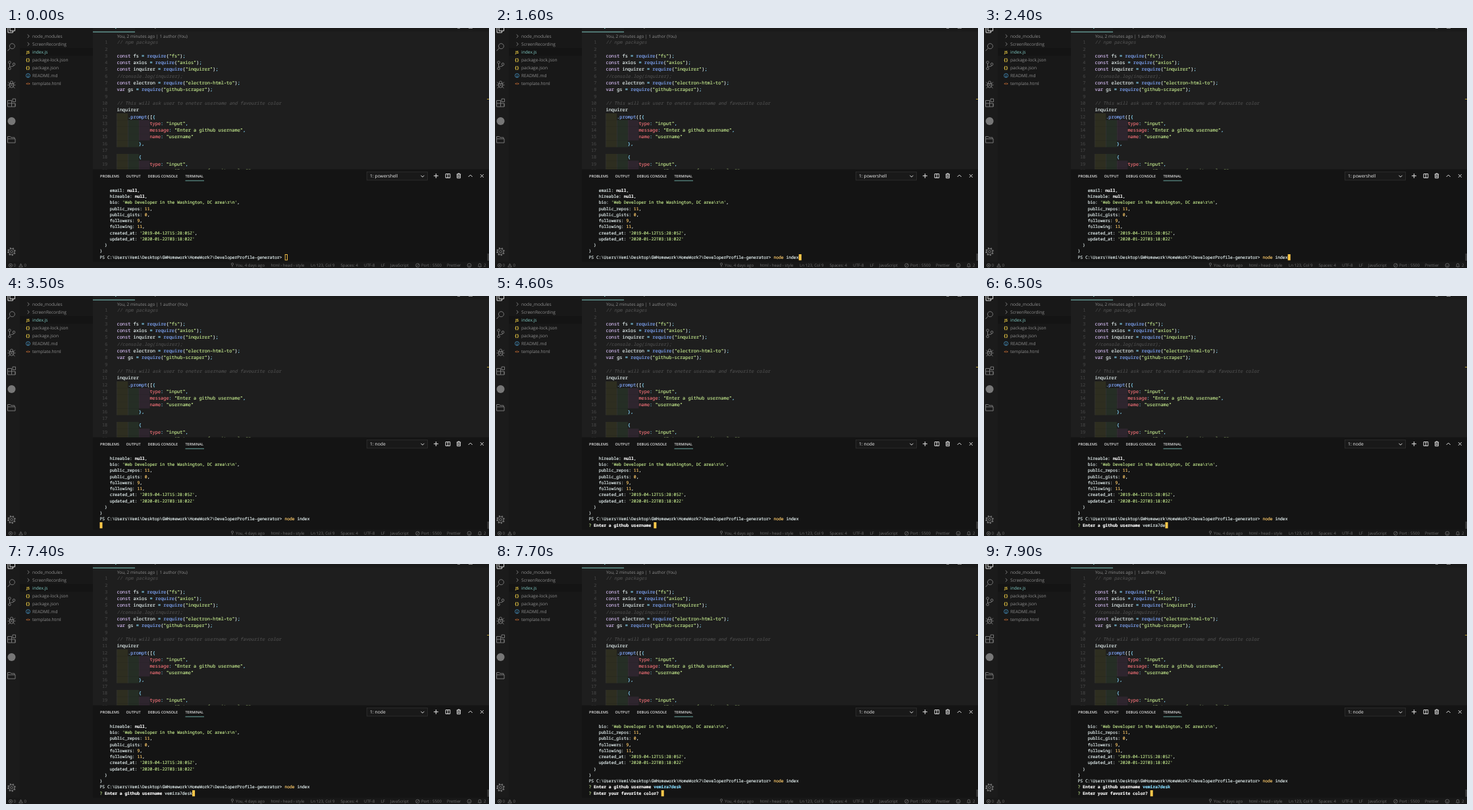
Write an HTML page that moves like this. It is 734x366 px and loops after 8000 ms.

```html
<!DOCTYPE html>
<html lang="en">
<head>
<meta charset="utf-8">
<title>Editor and terminal</title>
<style>
  html, body { margin: 0; width: 100%; height: 100%; overflow: hidden; background: #1e1e1e; }
  svg { display: block; }
  text { white-space: pre; text-rendering: geometricPrecision; }
  tspan { fill: currentColor; stroke: currentColor; stroke-width: .16; }
  .ui { font-family: "Open Sans", "Noto Sans", sans-serif; }
  .mono { font-family: "Noto Sans Mono", "Liberation Mono", monospace; }
  .icon { fill: none; stroke: #777; stroke-width: 1; stroke-linejoin: round; }
</style>
</head>
<body>
<svg id="stage" width="734" height="366" viewBox="0 0 734 366">
  <g id="editor"></g>
  <g id="chrome"></g>
  <g id="terminal"></g>
</svg>
<script>
const LOOP = 8000;
const NS = 'http://www.w3.org/2000/svg';
const byId = id => document.getElementById(id);
const editor = byId('editor'), chrome = byId('chrome'), terminal = byId('terminal');

const TEXT = '#e6f2f2', GREEN = '#c3e88d', YELLOW = '#ffcb6b', CYAN = '#89ddff',
  BLUE = '#82aaff', LILAC = '#d0b8ee', RED = '#f07178', ACCENT = '#80cbc4', BRIGHT = '#ffffff';

function add(parent, tag, attrs, content) {
  const el = document.createElementNS(NS, tag);
  for (const key in attrs) el.setAttribute(key, attrs[key]);
  if (content) el.textContent = content;
  return parent.appendChild(el);
}
const box = (parent, x, y, width, height, fill) => add(parent, 'rect', { x, y, width, height, fill });
const label = (x, y, str, size, fill, extra) =>
  add(chrome, 'text', { class: 'ui', x, y, 'font-size': size, fill, ...extra }, str);
const icon = (x, y, d, extra) =>
  add(chrome, 'path', { class: 'icon', d, transform: `translate(${x} ${y})`, ...extra });
const ring = r => `M${-r} 0a${r} ${r} 0 1 0 ${2 * r} 0a${r} ${r} 0 1 0 ${-2 * r} 0`;

// A line of monospaced text; each part is [string, colour, bold?]
function line(parent, x, y, size, parts) {
  const el = add(parent, 'text', { class: 'mono', x, y, 'font-size': size });
  for (const [str, color, bold] of parts)
    add(el, 'tspan', bold ? { color, 'font-weight': 700 } : { color }, str);
  return el;
}

// Splits a string by a pattern with named groups and colours the pieces
function colour(str, pattern, styles) {
  const parts = [];
  let at = 0;
  for (const m of str.matchAll(pattern)) {
    if (m.index > at) parts.push([str.slice(at, m.index), TEXT]);
    const kind = Object.keys(m.groups).find(k => m.groups[k] !== undefined);
    parts.push([m[0], ...styles[kind]]);
    at = m.index + m[0].length;
  }
  if (at < str.length) parts.push([str.slice(at), TEXT]);
  return parts;
}

function drawEditor() {
  const X = 168.5, CW = 4.17, LH = 10.3, TAB = CW * 4;
  const code = [
    '// npm packages',
    '',
    'const fs = require("fs");',
    'const axios = require("axios");',
    'const inquirer = require("inquirer");',
    '//console.log(inquirer);',
    'const electron = require("electron-html-to");',
    'var gs = require("github-scraper");',
    '',
    '// This will ask user to eneter username and favourite color',
    'inquirer',
    '    .prompt([{',
    '            type: "input",',
    '            message: "Enter a github username",',
    '            name: "username"',
    '        },',
    '',
    '        {',
    '            type: "input",',
    '            message: "Enter your favorite color?"'
  ];
  const pattern = new RegExp([
    '(?<comment>//.*)', '(?<string>"[^"]*")', '(?<word>\\b(?:const|var)\\b)',
    '(?<prop>\\b\\w+(?=:))', '(?<call>\\w+(?=\\())', '(?<mark>[=.,:;{}]+)'
  ].join('|'), 'g');
  const styles = { comment: ['#4c4c4c'], string: [GREEN], word: [LILAC], prop: [RED], call: [BLUE], mark: [CYAN] };
  const tints = ['#2e2e20', '#252e25', '#2e252e'];

  box(editor, 0, 0, 734, 366, '#1e1e1e');
  code.forEach((str, i) => {
    const y = 24.2 + i * LH;
    const indent = str.search(/\S/) / 4;
    for (let k = 0; k < indent; k++) {
      box(editor, X + k * TAB, y - 7.3, TAB, LH + .05, tints[k]);
      box(editor, X + k * TAB, y - 7.3, .6, LH + .05, '#383838');
    }
    const row = line(editor, X, y, CW / .6, colour(str, pattern, styles));
    if (str.startsWith('//')) row.setAttribute('font-style', 'italic');
    const num = String(i + 1);
    line(editor, 154.3 - num.length * CW, y, CW / .6, [[num, '#424242']]);
  });
}

function drawSidebar() {
  box(chrome, 0, 0, 21, 357, '#1b1b1b');
  box(chrome, 21, 0, 111, 357, '#181818');
  box(chrome, 21, 30.5, 111, 12, '#141414');

  const files = [
    ['', 'node_modules'], ['', 'ScreenRecording'], ['JS', 'index.js', '#f0cf45'],
    ['{}', 'package-lock.json', '#f0cf45'], ['{}', 'package.json', '#f0cf45'],
    ['i', 'README.md', '#4a9cd0'], ['<>', 'template.html', '#e07a3a']
  ];
  files.forEach(([mark, name, tone], i) => {
    const y = 12.5 + i * 12;
    label(40, y + 2.4, name, 6.65, i === 2 ? ACCENT : '#8c8c8c');
    if (!mark) icon(34, y, 'M-1.3-2.5L1.3 0L-1.3 2.5', { style: 'stroke:#999;stroke-width:.8' });
    else if (mark === '{}') label(33.6, y + 2.2, mark, 7, tone, { 'text-anchor': 'middle', 'font-weight': 700, 'letter-spacing': .6 });
    else label(33.5, y + 2, mark, mark === 'i' ? 5 : 5.8, tone, { 'text-anchor': 'middle', 'font-weight': 700 });
    if (mark === 'i') icon(33.5, y, ring(3), { style: `stroke:${tone};stroke-width:.8` });
  });

  icon(8.5, 0, 'M-2.5-3V4.3H5V-3M-2.5-1H-5.5V7H2V4.3', { style: 'stroke:#ddd' });
  icon(8.5, 29, 'M-2 1.5A4 4 0 1 1 1.2 2.7A4 4 0 0 1-2 1.5L-6 6');
  icon(8.5, 57, 'M-3-3V3M3.5 0C3.5 2.5-3 1-3 3M-4.8-4.6a1.8 1.8 0 1 0 3.6 0a1.8 1.8 0 1 0-3.6 0' +
    'M-4.8 4.8a1.8 1.8 0 1 0 3.6 0a1.8 1.8 0 1 0-3.6 0M1.7-1.8a1.8 1.8 0 1 0 3.6 0a1.8 1.8 0 1 0-3.6 0');
  icon(8.5, 86, 'M-3-1.5H3V2A3 3 0 0 1-3 2ZM-2-1.5V-3A2 2 0 0 1 2-3V-1.5M-3 1H-6M3 1H6' +
    'M-3-1L-5.3-3.5M3-1L5.3-3.5M-2.6 3.5L-5 5.8M2.6 3.5L5 5.8M-2.5-1.5L2.5 3.5M2.5-1.5L-2.5 3.5');
  icon(8.5, 114, 'M-6-3.5H0V6H-6ZM-6 1H5.5V6H0M5.5 1V6M1.5-6H6V-1.5H1.5Z');
  add(chrome, 'circle', { cx: 8.5, cy: 142, r: 6, fill: '#777' });
  icon(8.5, 170, 'M-6 5V-4.5H-2L-.5-3H4.5V-1M-6 5H5.5V-1H-6');
  icon(8.5, 341, ring(1.8));
  icon(8.5, 341, ring(4.3));
  icon(8.5, 341, ring(5.4), { style: 'stroke-width:1.8', 'stroke-dasharray': '2.1 2.14' });
}

function drawTop() {
  box(chrome, 196, 0, 538, 5.5, '#1a1a1a');
  box(chrome, 132, 5.5, 64, 1, ACCENT);
  box(chrome, 166, 0, 1.5, 1, ACCENT);
  box(chrome, 226, 0, 1.5, 1, '#777');
  box(chrome, 686, 0, 4, 1, '#888');
  box(chrome, 703, 0, 6, 1, '#888');
  box(chrome, 731, 108, 3, 1, '#b59a30');
  label(169, 15.4, 'You, 2 minutes ago | 1 author (You)', 6.5, '#8c8c8c');
}

function drawPanel() {
  box(chrome, 132, 215.5, 602, 141.5, '#141414');
  const tabs = [[143, 'PROBLEMS'], [182.5, 'OUTPUT'], [215.5, 'DEBUG CONSOLE'], [272.5, 'TERMINAL']];
  for (const [x, name] of tabs) label(x, 228, name, 5.5, '#e4e4e4', { 'font-weight': 600 });
  box(chrome, 272.5, 232.5, 28.5, .8, ACCENT);
  add(chrome, 'rect', { x: 548.5, y: 219.5, width: 92, height: 12.5, fill: '#191919', stroke: '#303030', 'stroke-width': .8 });

  const light = { style: 'stroke:#e0e0e0' };
  icon(633, 226, 'M-2.5-1.2L0 1.3L2.5-1.2', light);
  icon(653.5, 225.5, 'M-3.5 0H3.5M0-3.5V3.5', light);
  icon(671.5, 225.5, 'M-3.3-3H3.3V3H-3.3ZM0-3V3', light);
  icon(688, 225.5, 'M-3.2-2.5H3.2M-1.2-2.5V-3.6H1.2V-2.5M-2.4-2.5V3.3H2.4V-2.5M-.8-1V2M.8-1V2', light);
  icon(705.7, 225.5, 'M-3 1.5L0-1.5L3 1.5', light);
  icon(723.3, 225.5, 'M-2.4-2.4L2.4 2.4M2.4-2.4L-2.4 2.4', light);
  box(chrome, 731.5, 344, 2.5, 11, '#3c3c3c');
}

function drawStatus() {
  const tone = '#6c6c6c';
  box(chrome, 0, 356.5, 734, 9.5, '#181818');
  const items = [
    [11.5, '0'], [27.5, '0'], [349, 'You, 4 days ago'], [402.5, 'html › head › style'],
    [463, 'Ln 123, Col 9'], [508.5, 'Spaces: 4'], [544, 'UTF-8'], [569.7, 'LF'], [584, 'JavaScript'],
    [631, 'Port : 5500'], [670, 'Prettier'], [726, '2']
  ];
  for (const [x, str] of items) label(x, 364.2, str, 6.15, tone);
  const thin = { style: `stroke:${tone};stroke-width:.8` };
  icon(7, 362, ring(2.7) + 'M-1.2-1.2L1.2 1.2M1.2-1.2L-1.2 1.2', thin);
  icon(22.5, 362, 'M-2.8 2.4L0-2.7L2.8 2.4ZM0-.8V1', thin);
  icon(344, 361, 'M-1.6-1a1.6 1.6 0 1 0 3.2 0a1.6 1.6 0 1 0-3.2 0M0 .6V3.6', thin);
  icon(625.5, 362, ring(2.8) + 'M2-2L-2 2', thin);
  icon(704, 362, ring(3) + 'M-1.5.7Q0 2.2 1.5.7M-1-1V-.6M1-1V-.6', thin);
  icon(720, 362, 'M-2.5 1.8H2.5L1.8.6V-1A1.8 1.8 0 0 0-1.8-1V.6ZM-.6 2.8H.6', thin);
}

const CW = 3.8, LH = 9.27, ROWS = 12, LEFT = 142.5;
const USER = 'vemira7desk';
const output = [
  '    email: null,',
  '    hireable: null,',
  "    bio: 'Web Developer in the Washington, DC area\\r\\n',",
  '    public_repos: 11,',
  '    public_gists: 0,',
  '    followers: 9,',
  '    following: 11,',
  "    created_at: '2019-04-12T15:28:05Z',",
  "    updated_at: '2020-01-22T03:18:02Z'",
  '  }',
  '}'
].map(str => colour(str, /(?<string>'[^']*')|(?<none>\bnull\b)|(?<num>\b\d+\b)/g,
  { string: [GREEN], none: [BRIGHT, true], num: [YELLOW] }));

const at = { focus: 500, recall: 1600, run: 3500, ask: 4000, answer: 7700 };
// [time, letters typed]
const typing = [[4900, 1], [5100, 2], [5400, 3], [5500, 4], [5700, 6],
  [6100, 7], [6300, 8], [6400, 9], [6600, 10], [6800, 11]];

const question = str => [['? ', GREEN], [str + ' ', BRIGHT, true]];

function screen(t) {
  const prompt = [['PS C:\\Users\\Vemi\\Desktop\\GWHomework\\HomeWork7\\DeveloperProfile-generator> ', TEXT]];
  if (t >= at.recall) prompt.push(['node', YELLOW], [' index', TEXT]);
  const rows = [...output, prompt];
  if (t >= at.run) rows.push([]);
  if (t >= at.ask) {
    const count = typing.reduce((n, [time, letters]) => t >= time ? letters : n, 0);
    const done = t >= at.answer;
    rows[rows.length - 1] = [...question('Enter a github username'), [USER.slice(0, count), done ? CYAN : TEXT, done]];
    if (done) rows.push(question('Enter your favorite color?'));
  }
  return rows.slice(-ROWS);
}

function drawTerminal(t) {
  terminal.replaceChildren();
  const rows = screen(t);
  rows.forEach((parts, i) => line(terminal, LEFT, 249.7 + i * LH, CW / .6, parts));
  const length = rows[ROWS - 1].reduce((n, [str]) => n + str.length, 0);
  const x = LEFT + length * CW;
  if (t >= at.focus) box(terminal, x, 345, 4, 9.3, '#ffc84a');
  else add(terminal, 'rect', { x: x + .5, y: 345.5, width: 3.3, height: 8.4, fill: 'none', stroke: '#ffc84a', 'stroke-width': .9 });
  add(terminal, 'text', { class: 'ui', x: 553, y: 228.4, 'font-size': 6.8, fill: '#f0f0f0' },
    t >= at.run ? '1: node' : '1: powershell');
}

drawEditor();
drawSidebar();
drawTop();
drawPanel();
drawStatus();

const cues = [0, ...Object.values(at), ...typing.map(step => step[0])].sort((a, b) => a - b);
const start = performance.now();
let shown = -1;
function tick() {
  const t = (performance.now() - start) % LOOP;
  const cue = cues.filter(c => c <= t).pop();
  if (cue !== shown) drawTerminal(shown = cue);
  requestAnimationFrame(tick);
}
tick();
</script>
</body>
</html>
```
